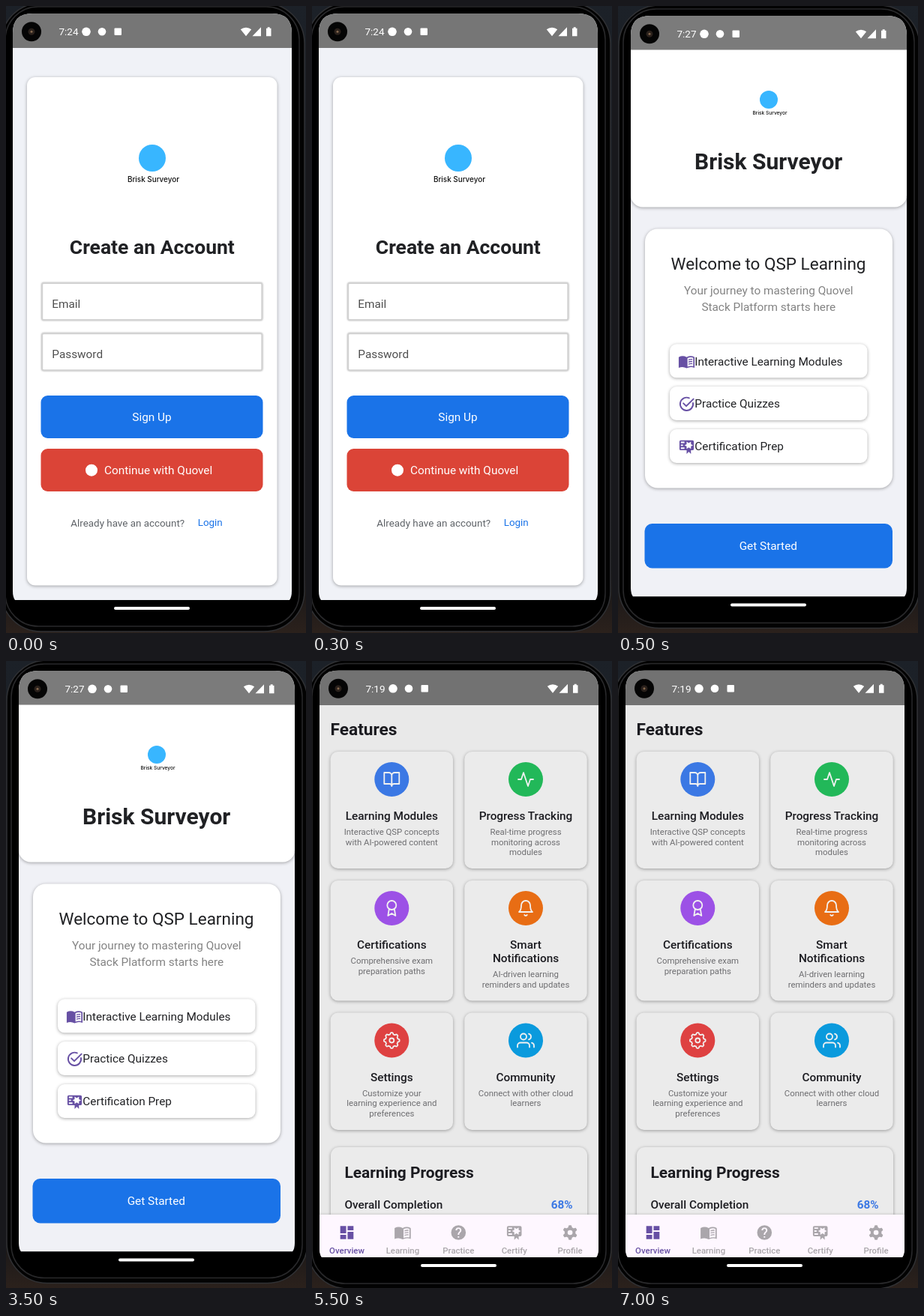
Animation, 400 px wide and 837 px high, one loop 8000 ms. Source, as an HTML page:

```html
<!DOCTYPE html>
<html lang="en">
<head>
<meta charset="utf-8">
<title>Learning app screens</title>
<style>
  html, body { margin: 0; height: 100%; overflow: hidden; background: #000; }
  svg { display: block; width: 100vw; height: 100vh; }
  text { font-family: Roboto, sans-serif; white-space: pre; }
  .mid { text-anchor: middle; }
  .wordmark { font-family: Inter, sans-serif; font-weight: 500; }
  .shadow { filter: drop-shadow(0 1px 2px rgba(0, 0, 0, .34)); }
  .field { filter: drop-shadow(0 0 1px rgba(0, 0, 0, .3)); }
  .screen { display: none; }
  .screen.on { display: inline; }
</style>
</head>
<body>
<svg id="stage" viewBox="0 0 400 837" preserveAspectRatio="none">
  <defs>
    <linearGradient id="desk" x2="0" y2="1">
      <stop offset="0" stop-color="#1c2128"/>
      <stop offset=".9" stop-color="#141517"/>
      <stop offset="1" stop-color="#2b211c"/>
    </linearGradient>
  </defs>
</svg>
<script>
const LOOP = 8000;
const BLUE = '#1a73e8', PURPLE = '#6750a4', INK = '#202124', DARK = '#1b1b20';
const BRAND = 'Brisk Surveyor';
// Type sizes shared by all screens.
const SMALL = 11.4, NOTE = 13.4, BODY = 15.35;

const box = (x1, y1, x2, y2, r, fill, extra = '') =>
  `<rect x="${x1}" y="${y1}" width="${x2 - x1}" height="${y2 - y1}" rx="${r}" fill="${fill}" ${extra}/>`;
const card = (x1, y1, x2, y2, r, fill = '#fff') => box(x1, y1, x2, y2, r, fill, 'class="shadow"');
const dot = (x, y, r, fill) => `<circle cx="${x}" cy="${y}" r="${r}" fill="${fill}"/>`;
const text = (s, x, y, size, fill, weight = 400, cls = '') =>
  `<text x="${x}" y="${y}" font-size="${size}" fill="${fill}" class="${cls}" font-weight="${weight}">${s}</text>`;
const mid = (s, x, y, size, fill, weight) => text(s, x, y, size, fill, weight, 'mid');

// A cog outline around (12, 12): a clipped cosine makes flat teeth.
function gear(teeth, radius, depth, hole) {
  let d = '';
  for (let i = 0; i < 120; i++) {
    const a = i / 120 * 2 * Math.PI;
    const wave = Math.max(-1, Math.min(1, 1.8 * Math.cos(teeth * a)));
    const r = radius + depth * wave;
    d += `${i ? 'L' : 'M'}${(12 + r * Math.sin(a)).toFixed(2)} ${(12 - r * Math.cos(a)).toFixed(2)}`;
  }
  return `${d}ZM${12 - hole} 12a${hole} ${hole} 0 1 0 ${2 * hole} 0a${hole} ${hole} 0 1 0 ${-2 * hole} 0`;
}

// Icon paths on a 24 by 24 grid.
const icons = {
  bookOpen: 'M2 3h6a4 4 0 0 1 4 4v14a3 3 0 0 0-3-3H2zM22 3h-6a4 4 0 0 0-4 4v14a3 3 0 0 1 3-3h7z',
  pulse: 'M22 12h-4l-3 9L9 3l-3 9H2',
  award: 'M6 8a6 6 0 1 0 12 0a6 6 0 1 0-12 0M8.5 13L7 22l5-3 5 3-1.5-9',
  bell: 'M18 8A6 6 0 0 0 6 8c0 7-3 9-3 9h18s-3-2-3-9M13.73 21a2 2 0 0 1-3.46 0',
  cogLine: gear(8, 9.3, 1, 3),
  users: 'M17 21v-2a4 4 0 0 0-4-4H5a4 4 0 0 0-4 4v2M5 7a4 4 0 1 0 8 0a4 4 0 1 0-8 0M23 21v-2a4 4 0 0 0-3-3.87M16 3.13a4 4 0 0 1 0 7.75',
  check: 'M20.9 10.6A9 9 0 1 1 15.5 3.7M7.5 11l4 4L21.5 5',
  tiles: 'M13 3v6h8V3zM13 21h8V11h-8zM3 21h8v-6H3zM3 13h8V3H3z',
  book: 'M1 5.8Q6.5 3 12 5.8Q17.5 3 23 5.8V20.8Q17.5 18.3 12 21.3Q6.5 18.3 1 20.8ZM13.2 7.2Q17.5 5.2 21.2 6.8V18.6Q17.5 17.7 13.2 19.3Z'
    + [9, 12, 15].map(y => `M14.6 ${y}q2.6-1 5.3-.7v1.4q-2.6-.3-5.3.7z`).join(''),
  help: 'M12 2a10 10 0 1 0 0 20a10 10 0 1 0 0-20M15.07 11.25l-.9.92C13.45 12.89 13 13.5 13 15h-2v-.5c0-1.11.45-2.11 1.17-2.83l1.24-1.26c.37-.36.59-.86.59-1.41a2 2 0 0 0-4 0H8a4 4 0 0 1 8 0a3.2 3.2 0 0 1-.93 2.25M13 19h-2v-2h2z',
  certificate: 'M4 3a2 2 0 0 0-2 2v10a2 2 0 0 0 2 2h8v5l3-3 3 3v-5h2a2 2 0 0 0 2-2V5a2 2 0 0 0-2-2zM12 5l3 2 3-2v3.5l3 1.5-3 1.5V15l-3-2-3 2v-3.5L9 10l3-1.5zM4 5h5v2H4zM4 9h3v2H4zM4 13h5v2H4z',
  cog: gear(6, 8.7, 1.3, 3.4),
};
function icon(name, cx, cy, scale, color, line = 0) {
  const paint = line
    ? `fill="none" stroke="${color}" stroke-width="${line}" stroke-linecap="round" stroke-linejoin="round"`
    : `fill="${color}" fill-rule="evenodd"`;
  return `<path d="${icons[name]}" transform="translate(${cx} ${cy}) scale(${scale}) translate(-12 -12)" ${paint}/>`;
}

function statusBar(left, top, right, time) {
  const y = top + 24.3, w = right - 61, x = left + 62;
  return dot(left + 25, y, 13, '#050505') + dot(left + 25, y, 4.5, '#2a211c') + dot(left + 25, y, 1.5, '#85694f')
    + text(time, x - .5, y + 4.8, 13.5, '#fff')
    + dot(x + 36, y, 5.8, '#fff') + dot(x + 57, y, 5.3, '#fff')
    + box(x + 73.5, y - 4.7, x + 83, y + 4.7, 1, '#fff')
    + `<path fill="#fff" d="M${w} ${y + 6}l-7.2-9a11.5 11.5 0 0 1 14.4 0zM${w + 8.5} ${y + 6}h11.5v-12z
        M${w + 27} ${y - 4.5}h1.7v-1.5h3v1.5h1.8v10.5h-6.5z"/>`;
}

function phone({ id, left, top, right, bottom, bar, time, back, barColor, content }) {
  const pill = (left + right) / 2 - .5;
  const outline = `M${left} ${top + 26}q0-26 26-26H${right - 26}q26 0 26 26V${bottom - 12}q0 8-3 12H${left + 3}q-3-4-3-12z`;
  return `<g class="screen" id="${id}">
    <clipPath id="${id}-clip"><path d="${outline}"/></clipPath>
    ${box(0, 0, 400, 837, 0, 'url(#desk)')}
    ${box(left - 16, top - 14, right + 17, bottom + 42, 54, '#030303', 'stroke="#303134" stroke-width="1.5"')}
    ${box(left - 10, top - 9, right + 10, bottom + 35, 44, '#000', 'stroke="#29292b" stroke-width="1.5"')}
    <g clip-path="url(#${id}-clip)">
      ${box(left, top, right, bottom, 0, back)}
      ${content}
      ${box(left, top, right, bar, 0, barColor)}
    </g>
    ${statusBar(left, top, right, time)}
    ${box(pill - 50.5, bottom + 9, pill + 50.5, bottom + 13, 2, '#fff')}
  </g>`;
}

const logo = (x, y, r, baseline, size) =>
  dot(x, y, r, '#38b6ff') + text(BRAND, x + 1.5, baseline, size, '#111', 500, 'mid wordmark');

const field = (label, y) => box(48.2, y, 341.3, y + 49, 2, '#fff', 'class="field" stroke="#d2d2d2" stroke-width="2"')
  + text(label, 61.3, y + 32.8, BODY, '#4f4f4f');

const signUp = card(28, 95, 361.5, 773.5, 11)
  + logo(195, 203, 18, 234.5, 9.9)
  + mid('Create an Account', 194.8, 331, 26.5, INK, 700)
  + field('Email', 370) + field('Password', 437.3)
  + box(46.5, 520, 342.5, 577, 9, BLUE) + mid('Sign Up', 194.5, 554, BODY, '#fff')
  + box(46.5, 591, 342.5, 648, 9, '#db4437') + dot(114, 619.7, 8, '#fff')
  + text('Continue with Quovel', 131, 625, BODY, '#fff')
  + text('Already have an account?', 86.3, 694.8, NOTE, '#5f6368')
  + text('Login', 255.7, 694, NOTE, BLUE);

const topic = (label, name, y, line) => card(69, y, 332.5, y + 45, 9)
  + icon(name, 91.5, y + 23.3, .96, PURPLE, line) + text(label, 102.3, y + 28.3, BODY, INK);

const welcome = card(17, 40, 385, 268.5, 16)
  + logo(201, 125, 12, 145, 6.6)
  + mid(BRAND, 200.7, 217.7, 30, INK, 700)
  + card(36, 297.5, 366, 643.5, 17)
  + mid('Welcome to QSP Learning', 200.5, 351.5, 22.5, INK)
  + mid('Your journey to mastering Quovel', 200.8, 385, BODY, '#838383')
  + mid('Stack Platform starts here', 200.8, 407.3, BODY, '#838383')
  + topic('Interactive Learning Modules', 'book', 451.3)
  + topic('Practice Quizzes', 'check', 508, 2)
  + topic('Certification Prep', 'certificate', 565)
  + box(35.5, 691, 366, 750.5, 10, BLUE) + mid('Get Started', 200.3, 726.2, BODY, '#fff');

const rows = [[121, 277], [293, 453.5], [469.5, 626]];
const features = [
  ['bookOpen', '#3b78e4', ['Learning Modules'], ['Interactive QSP concepts', 'with AI-powered content']],
  ['pulse', '#22b859', ['Progress Tracking'], ['Real-time progress', 'monitoring across', 'modules']],
  ['award', '#9c51e6', ['Certifications'], ['Comprehensive exam', 'preparation paths']],
  ['bell', '#e86d14', ['Smart', 'Notifications'], ['AI-driven learning', 'reminders and updates']],
  ['cogLine', '#de4141', ['Settings'], ['Customize your', 'learning experience and', 'preferences']],
  ['users', '#0a9add', ['Community'], ['Connect with other cloud', 'learners']],
];
function feature([name, color, title, notes], i) {
  const [y1, y2] = rows[i >> 1], x = i % 2 ? 285 : 106.3, y = y1 + 37;
  const noteY = y1 + 111.2 + 18 * (title.length - 1);
  return card(x - 81.7, y1, x + 81.7, y2, 10, '#ebebeb')
    + dot(x, y, 23, color) + icon(name, x, y, 1, '#f1f1f1', 1.8)
    + title.map((s, n) => mid(s, x, y1 + 91.4 + 18 * n, BODY, DARK, 500)).join('')
    + notes.map((s, n) => mid(s, x, noteY + 13.4 * n, SMALL, '#6d6d70')).join('');
}
const tabs = [['Overview', 'tiles'], ['Learning', 'book'], ['Practice', 'help'], ['Certify', 'certificate'], ['Profile', 'cog']];
function tab([label, name], i) {
  const x = 46.5 + 74.4 * i, color = i ? '#aaa6ab' : PURPLE;
  return icon(name, x, 763, .98, color) + mid(label, x, 790.8, SMALL, color, 500);
}
const overview = text('Features', 24.5, 99, 22.7, DARK, 700)
  + features.map(feature).join('')
  + card(25, 649, 367, 830, 11, '#ebebeb')
  + text('Learning Progress', 43.5, 690.3, 20.9, DARK, 700)
  + text('Overall Completion', 43.5, 731, BODY, DARK, 500)
  + text('68%', 318.7, 731, BODY, '#3b78e4', 700)
  + card(10, 739, 382, 800, 0, '#fef7ff')
  + tabs.map(tab).join('');

const screens = [
  { id: 'sign-up', start: 0, left: 9, top: 10, right: 381, bottom: 793, bar: 56, time: '7:24', back: '#f0f2f7', barColor: '#767676', content: signUp },
  { id: 'welcome', start: 500, left: 17, top: 13, right: 385, bottom: 788.5, bar: 58.5, time: '7:27', back: '#f0f1f6', barColor: '#7b7b7b', content: welcome },
  { id: 'overview', start: 5500, left: 10, top: 12.5, right: 382, bottom: 796, bar: 59, time: '7:19', back: '#e9e9e9', barColor: '#727272', content: overview },
];
const stage = document.getElementById('stage');
stage.insertAdjacentHTML('beforeend', screens.map(phone).join(''));
const groups = [...stage.querySelectorAll('.screen')];

function draw() {
  const t = performance.now() % LOOP;
  const current = screens.findLastIndex(s => t >= s.start);
  groups.forEach((g, i) => g.classList.toggle('on', i === current));
  requestAnimationFrame(draw);
}
draw();
</script>
</body>
</html>
```
